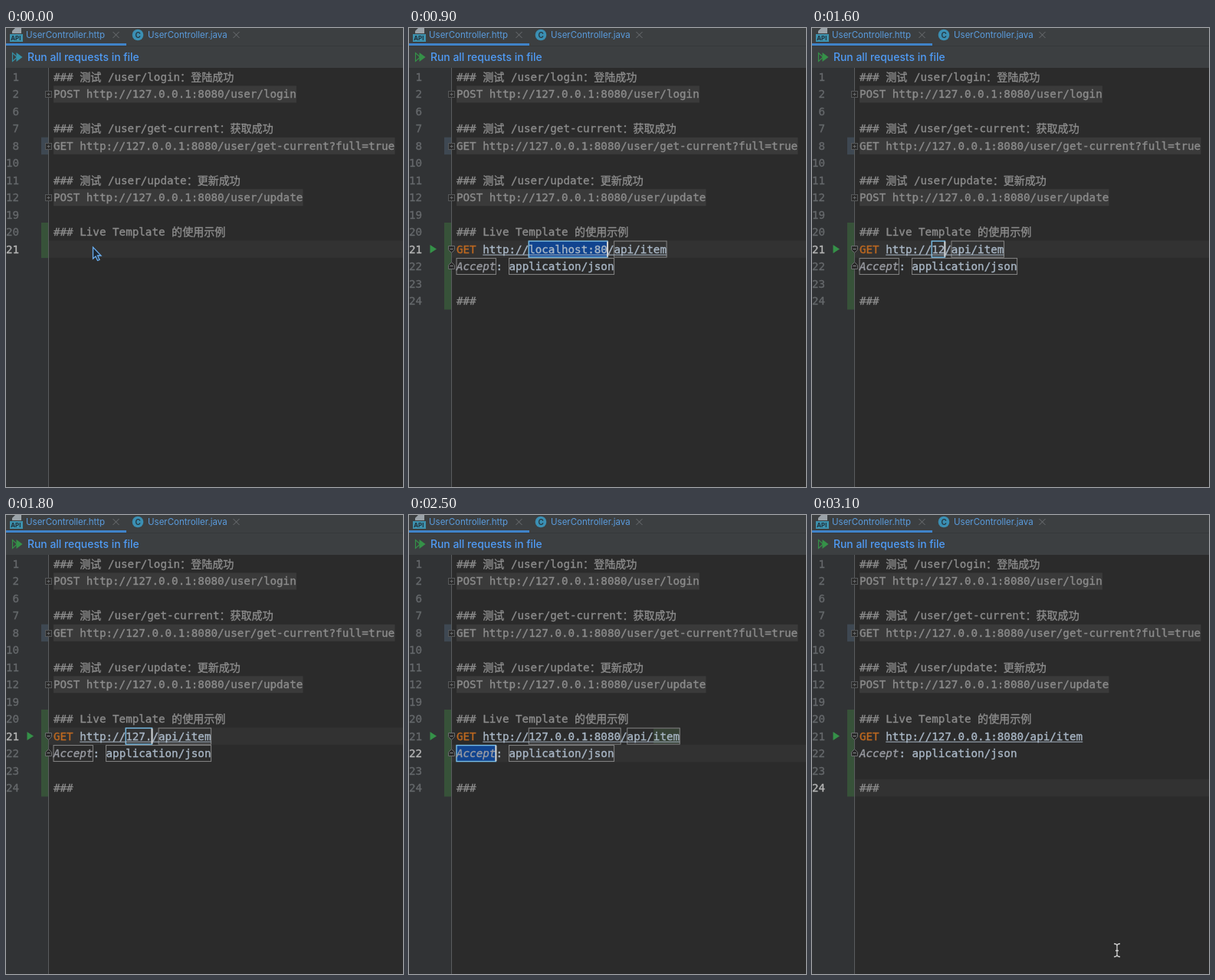
Recreate the animation shown at these times as an HTML page. Size 518x599 px, loop 3.2 s.

```html
<!DOCTYPE html>
<html lang="zh">
<head>
<meta charset="utf-8">
<title>Live Template</title>
<style>
html, body { margin: 0; width: 100%; height: 100%; overflow: hidden; background: #2b2b2b; }
svg { display: block; width: 518px; height: 599px; }
text { white-space: pre; }
.mono { font: 14.23px "DejaVu Sans Mono", "Noto Sans CJK SC", "Noto Sans CJK", monospace; stroke-width: .35px; }
.cjk { font-size: 14.05px; }
.ui { font-family: Inter, "DejaVu Sans", sans-serif; }
.it { font-style: italic; }
</style>
</head>
<body>
<svg id="stage" viewBox="0 0 518 599"></svg>
<script>
const LOOP = 3200, CHAR = 8.567, LEFT = 62, ROW = 22.46;
const NUMBERS = [1, 2, 6, 7, 8, 10, 11, 12, 19, 20, 21, 22, 23, 24];
const GREY = '#8c8c8c', CODE = '#a9b7c6', BLUE = '#4f9bf5', LIGHT = '#bbbdbf';
const stage = document.getElementById('stage');

const rowY = i => 64 + ROW * i;
const col = n => LEFT + CHAR * n;
const rect = (x, y, w, h, fill, more = '') =>
  `<rect x="${x}" y="${y}" width="${w}" height="${h}" fill="${fill}" ${more}/>`;
const path = (d, stroke, fill = 'none', w = 1) =>
  `<path d="${d}" stroke="${stroke}" fill="${fill}" stroke-width="${w}"/>`;
const mono = (x, y, s, fill, cls = '') =>
  `<text class="mono ${cls}" x="${x}" y="${y + 5}" fill="${fill}" stroke="${fill}">${s}</text>`;
const ui = (x, y, s, fill, size = 11.5, more = '') =>
  `<text class="ui" x="${x}" y="${y}" fill="${fill}" font-size="${size}" ${more}>${s}</text>`;
const cross = (x, y) => path(`M${x - 4} ${y - 4}l8 8m0-8l-8 8`, '#6d7073');
const caret = (x, n) => rect(x - 1, rowY(n) - 10, 2, 20, '#d0d0d0');

function header(ready) {
  const tone = ready ? '#359148' : '#3592a8';
  return rect(0, 0, 518, 52, '#3c3f41') +
    rect(0, 23, 518, 1, '#35383a') +
    rect(0, 20, 157, 3, '#4083c9') +
    path('M12 0h8v7h-12v-3z', 'none', '#9aa2a8') +
    rect(5, 8, 17, 10, '#3d91ad') +
    ui(6.3, 16, 'API', '#22313a', 7.8, 'font-weight="700"') +
    ui(26, 13, 'UserController.http', '#5a9bdc') +
    cross(143.5, 9) +
    '<circle cx="172" cy="9" r="7.3" fill="#3b8fb3"/>' +
    ui(168.5, 12.8, 'C', '#25343c', 10, 'font-weight="600"') +
    ui(185, 13, 'UserController.java', '#5a9bdc') +
    cross(300.5, 9) +
    path('M8.5 32.5v11l6-5.5z', tone, 'none', 1.2) +
    path('M13.5 32v12l8-6z', 'none', tone) +
    ui(28, 43, 'Run all requests in file', BLUE, 13.9, 'font-weight="500"');
}

function foldBox(y) {
  return rect(51.5, y - 4, 8, 8, '#2b2b2b', 'stroke="#57595a"') +
    path(`M53.5 ${y}h4m-2-2v4`, '#6a6c6e');
}

function foldTag(y, dir) {
  return path(`M51.5 ${y - 4 * dir}h8v${5 * dir}l-4 ${4 * dir}l-4 ${-4 * dir}z`, '#6b6d6e', '#2b2b2b') +
    path(`M53.5 ${y}h4`, '#858789');
}

function gutter(s) {
  const rows = s.tpl ? 14 : 11;
  let out = rect(0, 52, 56, 547, '#313335') +
    rect(56, rowY(s.line) - 11.2, 462, ROW, '#323232') +
    rect(46, rowY(4) - 11.2, 10, ROW, '#3e4852') +
    rect(46, 254, 10, rowY(rows - 1) + 11.5 - 254, '#375239') +
    path('M55.5 52V599', '#5a5d5f');
  for (let i = 0; i < rows; i++) {
    const label = String(NUMBERS[i]);
    out += mono(17.1 - CHAR * label.length, rowY(i), label, i === s.line ? '#b5b5b5' : '#65686b');
  }
  return out;
}

function requests() {
  const title = (i, s) => mono(LEFT, rowY(i), '### ' +
    s.replace(/[^\x00-\x7f]+/g, '<tspan class="cjk">$&</tspan>'), GREY);
  const folded = (i, s) =>
    rect(LEFT, rowY(i) - 11, CHAR * s.length, 22, '#3a3a3a') +
    mono(LEFT, rowY(i), s, GREY) + foldBox(Math.round(rowY(i)) + .5);
  return title(0, '测试 /user/login：登陆成功') +
    folded(1, 'POST http://127.0.0.1:8080/user/login') +
    title(3, '测试 /user/get-current：获取成功') +
    folded(4, 'GET http://127.0.0.1:8080/user/get-current?full=true') +
    title(6, '测试 /user/update：更新成功') +
    folded(7, 'POST http://127.0.0.1:8080/user/update') +
    title(9, 'Live Template 的使用示例');
}

// Fields in tab order: host, path, header, value
function template(s) {
  const host = s.host, slash = 11 + host.length;
  const url = 'http://' + host + '/api/item';
  const fields = [
    [10, 11, host.length], [10, slash + 1, 8], [11, 0, 6], [11, 8, 16]
  ];
  const box = ([r, start, len], i) => {
    const on = i === s.field;
    const fill = on && s.sel ? '#11448f' : on && s.list ? '#344134' : 'none';
    return rect(col(start), rowY(r) - 10.5, CHAR * len, 21, fill,
      `stroke="${on ? '#78bde6' : '#858585'}" stroke-width="${on ? 1.4 : 1}"`);
  };
  let out = '';
  if (s.field >= 2) out += rect(col(slash + 5), rowY(10) - 10, CHAR * 4, 20, '#364135');
  if (s.field >= 0) out += fields.map(box).join('');
  out += mono(LEFT, rowY(10), 'GET', '#bd6820') +
    mono(col(4), rowY(10), url, CODE) +
    path(`M${col(4)} ${rowY(10) + 7.5}H${col(4 + url.length)}`, CODE) +
    mono(LEFT, rowY(11), 'Accept', '#9a9ca3', 'it') +
    mono(col(6), rowY(11), ': application/json', CODE) +
    mono(LEFT, rowY(13), '###', GREY) +
    foldTag(288.5, 1) + foldTag(310.5, -1) +
    path('M27.5 283v11l8.5-5.5z', 'none', '#359148');
  if (s.field >= 0 && !s.list) {
    const [r, start, len] = fields[s.field];
    out += caret(col(start + len), r);
  }
  return out;
}

function panel(x, rows, picked, tone) {
  const h = rows * 21.4 + 21.3;
  return rect(x, 302, 530 - x, h, '#000', 'opacity=".4" style="filter:blur(3px)"') +
    rect(x, 299.5, 520 - x, h, '#46484a') +
    rect(x, 299.5 + 21.4 * picked, 520 - x, 21.4, tone);
}

const match = (x, y, hit, rest) => mono(x, y, hit, BLUE) + mono(x + CHAR * hit.length, y, rest, LIGHT);
const nextTip = (x, y) => ui(x, y, 'Next Tip', BLUE, 11.5, 'font-weight="500"');

function snippets(typed) {
  const item = (y, name, x, hint) =>
    match(LEFT, y, typed, name.slice(typed.length)) + mono(x, y, hint, '#8b8d8f');
  const tip = (x, s) => ui(x, 357, s, '#8b8d8f');
  return panel(57, 2, 0, '#4e5257') +
    item(310.5, 'gtr', 369, 'GET http://example.com/api') +
    item(331.5, 'gtrp', 318, 'GET http://example.com/get') +
    path('M63 353l3.5-4 3.5 4m6-5v9m-3.5-3.5l3.5 3.5 3.5-3.5', '#8b8d8f') +
    tip(87, 'and') +
    path('M112 353l3.5-4 3.5 4m6 4v-9m-3.5 3.5l3.5-3.5 3.5 3.5', '#8b8d8f') +
    tip(135, 'will move caret down and up in the editor') +
    nextTip(367, 357);
}

function globe(y) {
  return `<circle cx="143.5" cy="${y}" r="6.8" fill="none" stroke="#b4b7b9" stroke-width="1.2"/>` +
    path(`M138 ${y - 3}l5-2 3 1-2 3-3 1 3 2 0 4-3-3-3-2zM147 ${y}l3 0-2 4-2-1z`, 'none', '#b4b7b9');
}

function hosts(picked) {
  const tip = (x, s) => ui(x, 378.5, s, '#8b8d8f');
  const rest = ['', '0.0.1:8080', '0.0.1:18083'];
  return panel(128, 3, picked, picked ? '#04375f' : '#4e5257') +
    rest.map((r, i) => globe(310 + 21.4 * i) + match(156, 310 + 21.4 * i, '127.', r)).join('') +
    tip(134, 'Press') +
    path('M177 370.5v4h-9m3-3l-3 3 3 3', '#8b8d8f') +
    tip(181, 'to insert,') +
    path('M234 374.5h8m-3-3l3 3-3 3m4.5-6.5v7', '#8b8d8f') +
    tip(247, 'to replace') +
    nextTip(309, 378.5);
}

const arrow = path('M113.5 286v15l3.5-3 2.5 5.5 2.5-1-2.5-5.5h4.5z', '#6aaef0', '#1c2733', 1.3);
const beam = path('M394 559.5q4 0 4 3v11q0 3-4 3m8-17q-4 0-4 3m0 11q0 3 4 3m-6-8h4', '#d2d2d2', 'none', 1.3);

// Each step adds to the state before it
const STEPS = [
  [0, { line: 10, typed: '', mouse: arrow, field: -1 }],
  [400, { typed: 'g', mouse: '' }],
  [500, { popup: true }],
  [600, { typed: 'gt' }],
  [700, { typed: 'gtr' }],
  [900, { popup: false, tpl: true, host: 'localhost:80', field: 0, sel: true }],
  [1500, { host: '1', sel: false }],
  [1600, { host: '12' }],
  [1700, { host: '127' }],
  [1800, { host: '127.' }],
  [1900, { list: true, pick: 0 }],
  [2100, { pick: 1 }],
  [2300, { list: false, host: '127.0.0.1:8080' }],
  [2400, { field: 1, sel: true }],
  [2500, { field: 2, line: 11 }],
  [2600, { field: 3 }],
  [2700, { field: -1, line: 13 }],
  [2900, { mouse: beam }]
];

function draw(s) {
  let out = rect(0, 0, 518, 599, '#2b2b2b') + header(s.tpl) + gutter(s) + requests();
  if (s.tpl) out += template(s);
  else if (s.typed) out += mono(LEFT, rowY(10), s.typed, CODE) + caret(col(s.typed.length), 10);
  if (s.popup) out += snippets(s.typed);
  if (s.list) out += hosts(s.pick);
  stage.innerHTML = out + s.mouse;
}

let shown = -1;
function tick() {
  const t = performance.now() % LOOP;
  const past = STEPS.filter(step => step[0] <= t);
  if (past.length !== shown) {
    shown = past.length;
    draw(Object.assign({}, ...past.map(step => step[1])));
  }
  requestAnimationFrame(tick);
}
tick();
</script>
</body>
</html>
```
